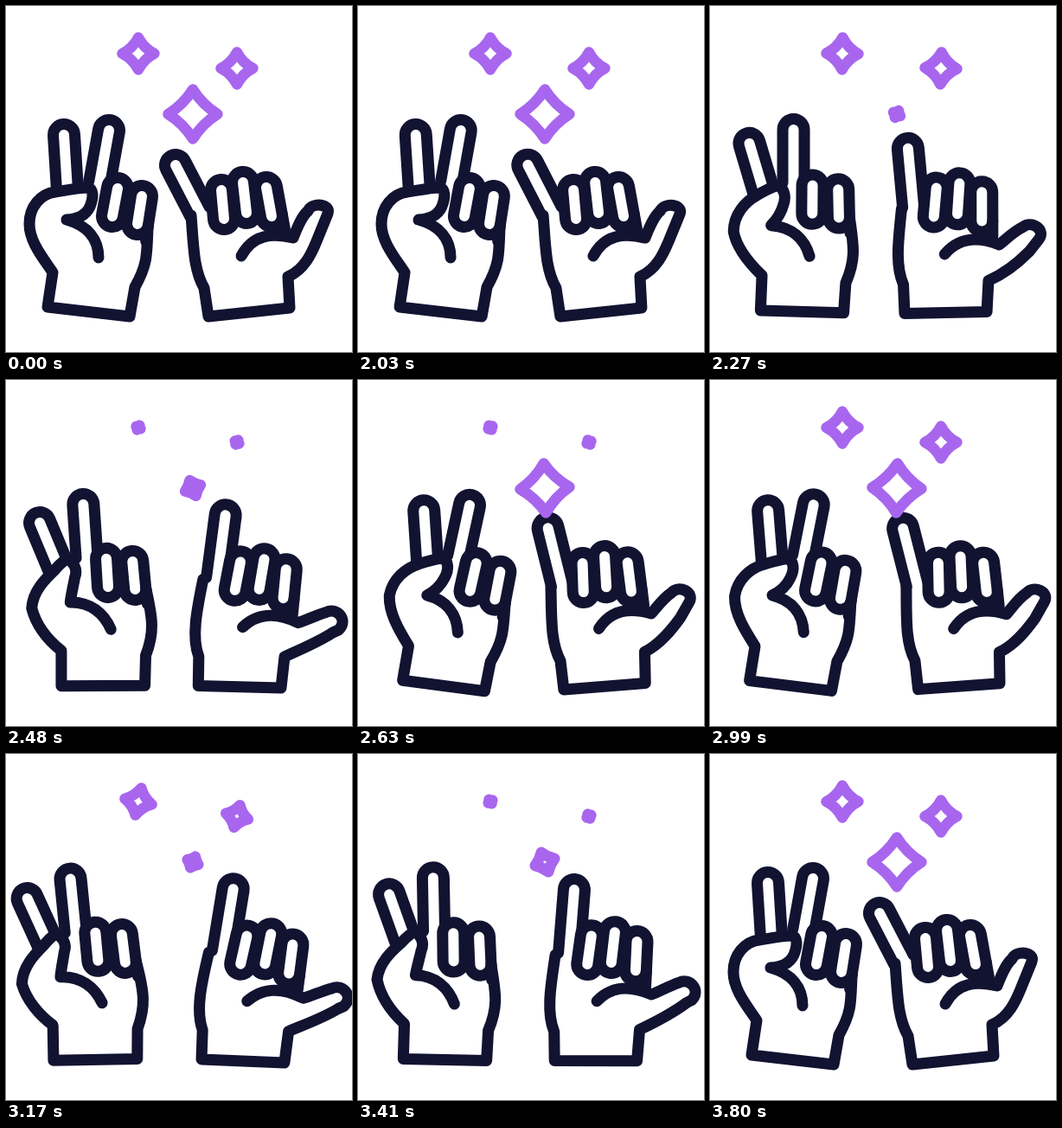
An HTML page that plays this animation: 400x400 px, repeating every 3830 ms.

```html
<!DOCTYPE html>
<html lang="en">
<head>
<meta charset="utf-8">
<title>Hand signs</title>
<style>
  html, body { margin: 0; width: 100%; height: 100%; overflow: hidden; background: #fff; }
  svg { display: block; width: 100%; height: 100%; }
  path { fill: #fff; stroke: #121331; stroke-width: 13; stroke-linecap: round; stroke-linejoin: round; }
  .star { stroke: #a866ee; stroke-width: 12.5; }
</style>
</head>
<body>
<svg id="stage" viewBox="0 0 400 400"></svg>
<script>
const LOOP = 3830;
const TIMES = [2010, 2480, 2780, 3170, 3410, 3800];
const SWING = 1.5;      // how far the motion carries through a key
const FINGER = 12.5;    // half the width of a finger
const WRIST = 295;      // height around which the hands bend
const SPIN = 680;       // duration of one star spin
const stage = document.getElementById('stage');

const mix = (a, b, p) => a + (b - a) * p;
const clamp = v => Math.min(1, Math.max(0, v));
const smooth = v => { const p = clamp(v); return p * p * (3 - 2 * p); };

// Text of coordinates to a list of points.
function points(text) {
  const n = text.trim().split(/\s+/).map(Number);
  return Array.from({ length: n.length / 2 }, (_, i) => [n[2 * i], n[2 * i + 1]]);
}

function addPath(className) {
  const path = document.createElementNS('http://www.w3.org/2000/svg', 'path');
  if (className) path.setAttribute('class', className);
  stage.append(path);
  return path;
}

// Smooth curve through the keys, at rest on both ends.
function sample(keys, t) {
  const last = TIMES.length - 1;
  if (t <= TIMES[0]) return keys[0];
  if (t >= TIMES[last]) return keys[last];
  const i = TIMES.findIndex(end => end > t) - 1;
  const span = TIMES[i + 1] - TIMES[i];
  const p = (t - TIMES[i]) / span, q = 1 - p;
  const slope = (k, j) => k === 0 || k === last ? 0 :
    SWING * (keys[k + 1][j] - keys[k - 1][j]) / (TIMES[k + 1] - TIMES[k - 1]);
  return keys[i].map((v, j) => mix(v, keys[i + 1][j], smooth(p)) +
    span * p * q * (q * slope(i, j) - p * slope(i + 1, j)));
}

// Leans a point sideways; the forearm follows less than the fingers.
function bender(axis, lean, shift) {
  return ([x, y]) => {
    const rise = WRIST - y;
    const pull = lean * (rise > 0 ? 1 : .6);
    return [
      x + shift + pull * rise,
      y + .8 * pull * (x - axis) + .5 * lean * lean * Math.max(0, rise)
    ];
  };
}

// Finger from tip a to root b: open at the root or a closed capsule.
function finger([[ax, ay], [bx, by]], closed) {
  const len = Math.hypot(bx - ax, by - ay);
  const x = (ay - by) / len * FINGER, y = (bx - ax) / len * FINGER;
  const arc = `A${FINGER} ${FINGER} 0 0 1 `;
  const d = `M${bx + x} ${by + y}L${ax + x} ${ay + y}${arc}${ax - x} ${ay - y}L${bx - x} ${by - y}`;
  return closed ? `${d}${arc}${bx + x} ${by + y}Z` : d;
}

// Short edge that joins the outermost finger to the palm.
function edge([[ax, ay], [bx, by]]) {
  const len = Math.hypot(bx - ax, by - ay);
  const ux = (bx - ax) / len, uy = (by - ay) / len;
  return `M${bx + uy * FINGER} ${by - ux * FINGER}l${ux * 18} ${uy * 18}`;
}

function outline(commands, pts) {
  let at = 0;
  return [...commands].map(c => c + pts.slice(at, at += c === 'C' ? 3 : 1).join(' ')).join('');
}

// first: the finger that moves by itself, and thumb: each as [closed, open].
// keys: lean, shift, openness.
const hands = [
  {
    axis: 95,
    commands: 'MCLLLCCCCCC',
    first: ['67 149 71 213', '66 155 75 218'],
    straight: ['119 144 108 205'],
    folded: ['129 211 123 243', '157 220 152 252'],
    sleeve: '164 255 163 290 163 300 149 325 143 359 48 348 54 308',
    thumb: [
      `42 290 27 272 27 252  27 232 40 217 57 215  70 213 85 210 94 210
       102 211 101 222 97 232  92 243 82 246 70 247  95 254 107 270 107 291`,
      `42 290 33 270 33 250  39 231 56 220 69 212  75 207 81 204 85 202
       92 206 95 216 89 225  85 234 80 244 77 252  99 256 111 272 114 292`
    ],
    keys: [[0, 0, 0], [-.25, 8, 1], [.27, 0, 0], [-.28, -2, 1], [-.2, -2, 1], [0, 0, 0]]
  },
  {
    axis: 275,
    commands: 'MCLLLCLCCC',
    first: ['196 184 224 238', '218 164 229 238'],
    straight: [],
    folded: ['249 213 252 246', '274 204 278 239', '301 210 307 243'],
    sleeve: '214 242 217 280 217 305 229 326 234 359 328 349 326 313',
    thumb: [
      `346 304 354 284 359 272  372 240  376 229 354 226 349 237
       341 244 336 258 332 268  308 262 285 264 272 289`,
      `342 303 360 283 372 269  377 265  385 252 369 239 358 248
       348 254 339 262 331 267  301 260 283 268 272 286`
    ],
    keys: [[0, 0, 0], [.28, -1, 1], [-.14, 12, 0], [.31, 4, 1], [.23, 2, 1], [0, 0, 0]]
  }
];

for (const hand of hands) {
  hand.first = hand.first.map(points);
  hand.thumb = hand.thumb.map(points);
  hand.sleeve = points(hand.sleeve);
  hand.firstPath = addPath();
  hand.straight = hand.straight.map(text => ({ bone: points(text), path: addPath() }));
  hand.palm = addPath();
  hand.folded = hand.folded.map(text => ({ bone: points(text), path: addPath() }));
  hand.edge = addPath();
}

function drawHand(hand, t) {
  const [lean, shift, openness] = sample(hand.keys, t);
  const bend = bender(hand.axis, lean, shift);
  const blend = ([closed, open]) =>
    closed.map((pt, i) => pt.map((v, j) => mix(v, open[i][j], clamp(openness))));
  hand.firstPath.setAttribute('d', finger(blend(hand.first).map(bend), false));
  for (const { bone, path } of hand.straight) path.setAttribute('d', finger(bone.map(bend), false));
  for (const { bone, path } of hand.folded) path.setAttribute('d', finger(bone.map(bend), true));
  const palm = [...hand.sleeve, ...blend(hand.thumb)].map(bend);
  hand.palm.setAttribute('d', outline(hand.commands, palm));
  hand.edge.setAttribute('d', edge(hand.folded.at(-1).bone.map(bend)));
}

const stars = [
  { x: 153, y: 55, tip: 18.5, waist: 6.3, starts: [2225, 3015] },
  { x: 267, y: 72, tip: 18.5, waist: 6.3, starts: [2210, 2995] },
  { x: 216, y: 125, tip: 28.5, waist: 11, starts: [2020, 2940] }
];

for (const star of stars) star.path = addPath('star');

// Each spin is a quarter turn during which the star shrinks and grows back.
function drawStar({ x, y, tip, waist, starts, path }, t) {
  const start = t < starts[1] ? starts[0] : starts[1];
  const p = smooth((t - start) / SPIN);
  const scale = mix(.15, 1, smooth((Math.abs(p - .5) - .18) / .25));
  const r = tip * scale, k = waist * scale;
  path.setAttribute('d',
    `M0 ${-r}Q${k} ${-k} ${r} 0Q${k} ${k} 0 ${r}Q${-k} ${k} ${-r} 0Q${-k} ${-k} 0 ${-r}Z`);
  path.setAttribute('transform', `translate(${x} ${y}) rotate(${90 * p})`);
}

function draw() {
  const t = performance.now() % LOOP;
  for (const hand of hands) drawHand(hand, t);
  for (const star of stars) drawStar(star, t);
  requestAnimationFrame(draw);
}
draw();
</script>
</body>
</html>
```
